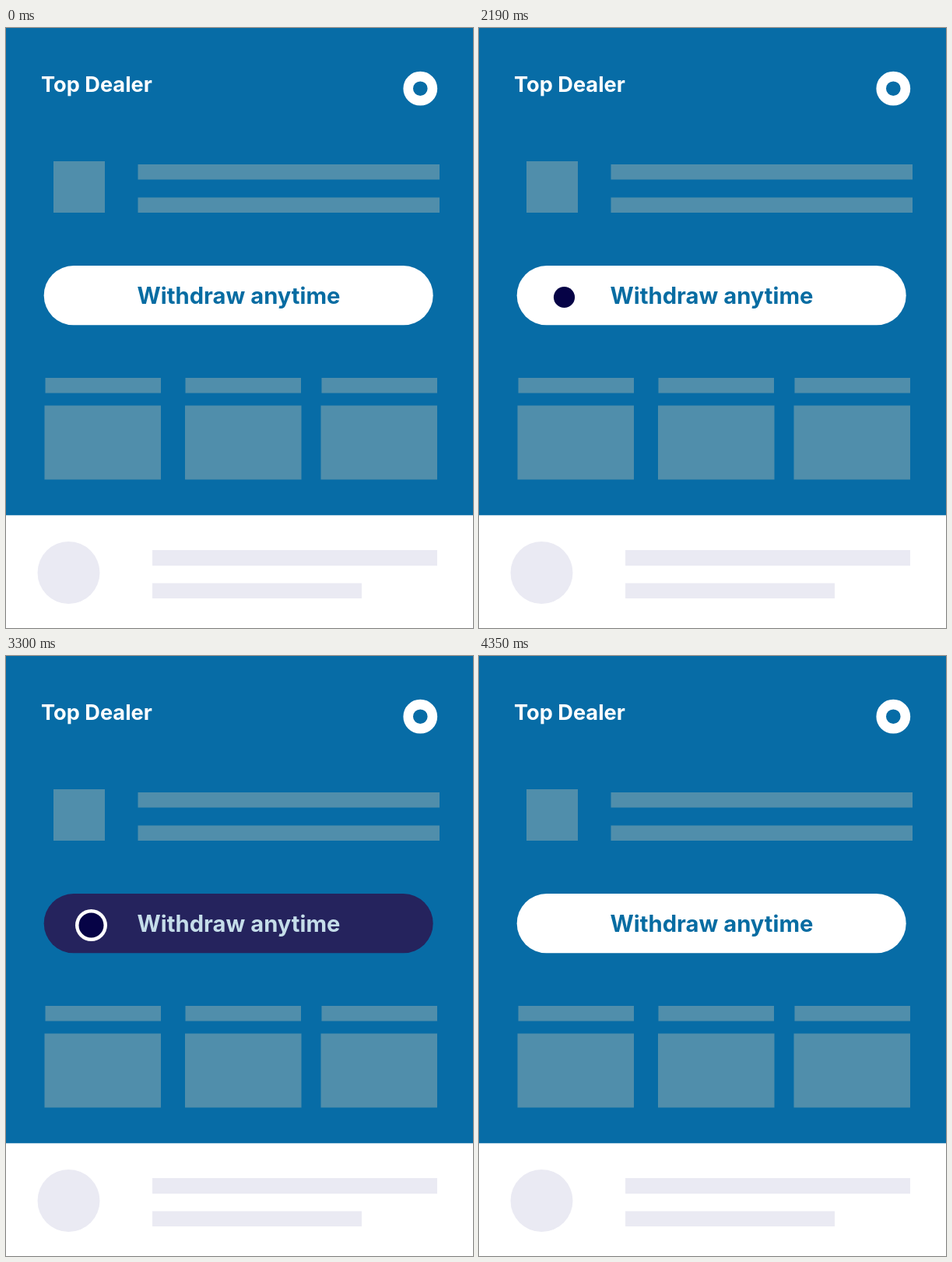
These frames come from a looping animation (600 px wide and 770 px high, 5130 ms). An HTML page:

```html
<!DOCTYPE html>
<html lang="en">
<head>
<meta charset="utf-8">
<title>Withdraw button</title>
<style>
  html, body { margin: 0; width: 100%; height: 100%; overflow: hidden; }
  svg { display: block; width: 100vw; height: 100vh; }
  text { font-family: Inter, "Open Sans", sans-serif; font-weight: 700; }
</style>
</head>
<body>
<svg viewBox="0 0 600 770">
  <defs>
    <clipPath id="inPill"><rect x="48.7" y="305" width="500" height="76.300" rx="38.150"/></clipPath>
  </defs>
  <rect width="600" height="770" fill="#fff"/>
  <rect width="600" height="625.300" fill="#076ca6"/>
  <text x="45" y="81.500" font-size="27.200" fill="#fff">Top Dealer</text>
  <circle cx="532.300" cy="77.700" r="15.600" fill="none" stroke="#fff" stroke-width="12.600"/>

  <g fill="#508eab">
    <rect x="61" y="171" width="66" height="66"/>
    <path d="M169.500 175h387.500v19.500h-387.500zM169.500 217.500h387.500v19.500h-387.500z"/>
    <path d="M50.500 449h148.500v19.500h-148.500zM230.500 449h148.500v19.500h-148.500zM405.500 449h148.500v19.500h-148.500z"/>
    <path d="M49.500 484.500h149.500v95h-149.500zM230 484.500h149.500v95h-149.500zM404.500 484.500h149.500v95h-149.500z"/>
  </g>
  <g fill="#eaeaf3">
    <circle cx="80.500" cy="699" r="40"/>
    <path d="M188 670h366v20h-366zM188 712.500h269v19.500h-269z"/>
  </g>

  <circle id="pointer" r="16" fill="#fff"/>
  <rect id="pill" x="48.700" y="305" width="500" height="76.300" rx="38.150"/>
  <text id="label" x="299" y="354" font-size="29.200" text-anchor="middle">Withdraw anytime</text>
  <g clip-path="url(#inPill)">
    <g id="cursor">
      <circle r="20.500" fill="#fff"/>
      <circle id="dot" fill="#060346"/>
      <circle id="hole" fill="#fff"/>
    </g>
  </g>
</svg>
<script>
const LOOP = 5130, STEP = 30;
const WHITE = [255, 255, 255], NAVY = [6, 3, 70], BLUE = [7, 108, 162];
const el = id => document.getElementById(id);
const [pointer, pill, label, cursor, dot, hole] =
  ["pointer", "pill", "label", "cursor", "dot", "hole"].map(el);

const progress = (t, from, to) => Math.min(1, Math.max(0, (t - from) / (to - from)));
const easeOut = (p, power) => 1 - (1 - p) ** power;
const lerp = (a, b, p) => a + (b - a) * p;
const mix = (a, b, p) => `rgb(${a.map((v, i) => Math.round(lerp(v, b[i], p)))})`;

function draw(t) {
  // The pointer glides in from the lower left; it turns navy inside the pill.
  const move = easeOut(progress(t, 840, 1920), 1.5);
  const place = `translate(${lerp(-16, 109.5, move)} ${lerp(478, 345.5, move)})`;
  const shown = t >= 870 && t < 4350;
  for (const part of [pointer, cursor]) {
    part.setAttribute("transform", place);
    part.setAttribute("visibility", shown ? "visible" : "hidden");
  }

  // Press and release, then a white hole opens until the dot is gone.
  const press = Math.sin(Math.PI * progress(t, 1920, 3120)) ** 2;
  dot.setAttribute("r", 16 - 5.7 * press);
  hole.setAttribute("r", 16 * easeOut(progress(t, 3540, 4350), 1.5));

  const dark = easeOut(progress(t, 2460, 3000), 6);
  const back = progress(t, 3030, 3570);
  pill.setAttribute("fill", mix(WHITE, NAVY, dark * (1 - back ** 3)));
  label.setAttribute("fill", mix(BLUE, WHITE, dark * (1 - back ** 2.1)));
}

const start = performance.now();
function tick() {
  const t = (performance.now() - start) % LOOP;
  draw(Math.floor(t / STEP) * STEP);
  requestAnimationFrame(tick);
}
tick();
</script>
</body>
</html>
```
